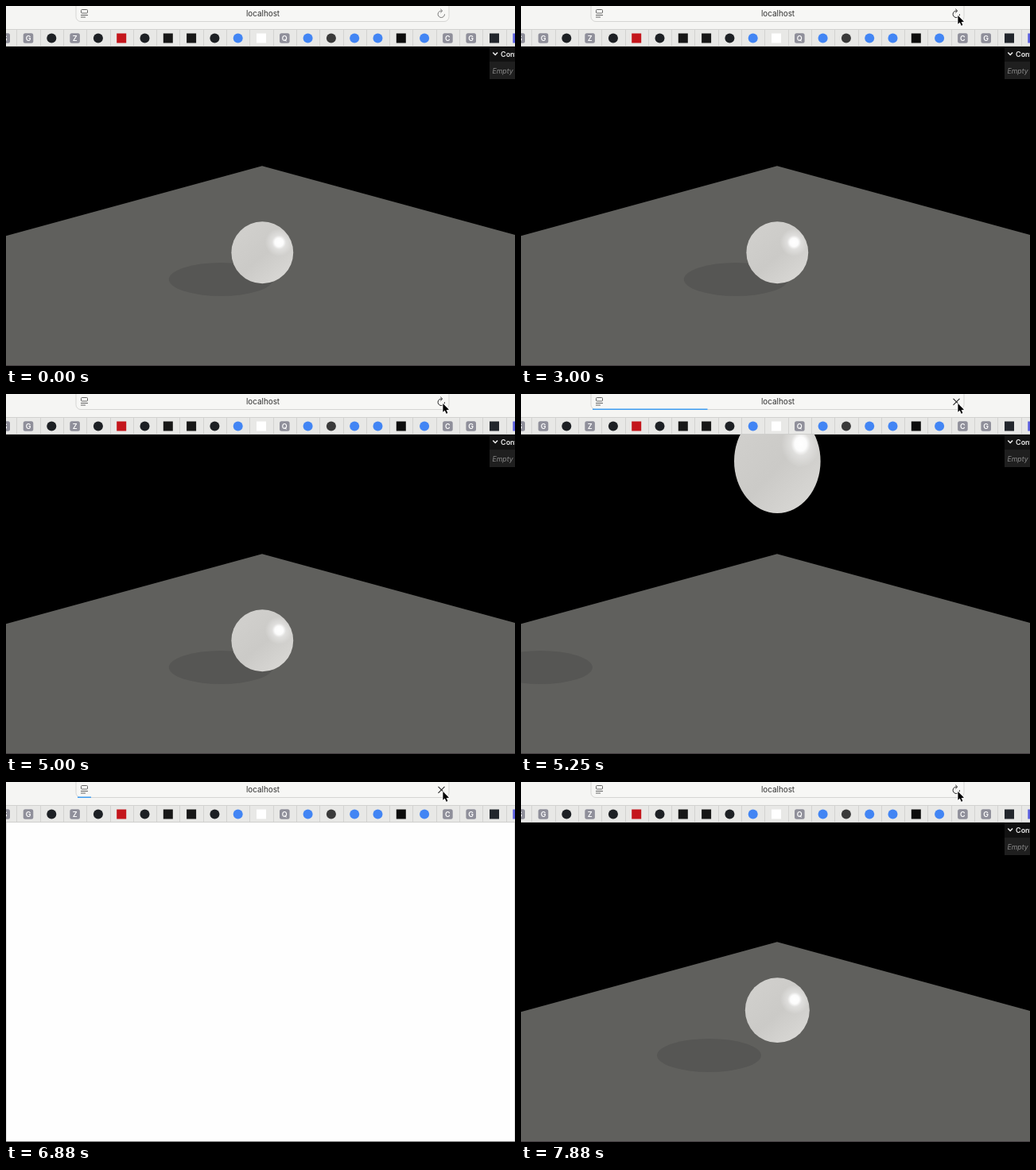
Recreate the animation shown at these times as an HTML page with a canvas. Size 640 by 453 pixels, loop 8000 ms.

```html
<!DOCTYPE html>
<html lang="en">
<head>
<meta charset="utf-8">
<title>Bouncing ball</title>
<style>
html, body { margin: 0; height: 100%; overflow: hidden; background: #000; }
canvas { display: block; width: 640px; height: 453px; }
</style>
</head>
<body>
<canvas id="stage" width="640" height="453"></canvas>
<script>
const ctx = document.getElementById('stage').getContext('2d');
const LOOP = 8000, GRAVITY = 9.82, BOUNCE = 0.372, RADIUS = 0.5;
const RELOADS = [1330, 3076, 5093, 6840];
// Camera at (-3, 3, 3) looking at the origin
const FOCAL = 380, CX = 322, CY = 342.7, DIST = Math.sqrt(27);
const FONT = 'Inter, "Liberation Sans", sans-serif';
const clamp = v => Math.max(0, Math.min(1, v));

function rect(x, y, w, h, fill) {
  ctx.fillStyle = fill;
  ctx.fillRect(x, y, w, h);
}

function round(x, y, w, h, r, fill) {
  ctx.beginPath();
  ctx.roundRect(x, y, w, h, r);
  ctx.fillStyle = fill;
  ctx.fill();
}

function ellipse(x, y, rx, ry, fill) {
  ctx.beginPath();
  ctx.ellipse(x, y, rx, ry, 0, 0, 7);
  ctx.fillStyle = fill;
  ctx.fill();
}

function path(points, close) {
  ctx.beginPath();
  points.forEach(([x, y]) => ctx.lineTo(x, y));
  if (close) ctx.closePath();
}

function stroke(color, width) {
  ctx.strokeStyle = color;
  ctx.lineWidth = width;
  ctx.stroke();
}

function text(str, x, y, style, fill, align = 'left') {
  ctx.font = `${style} ${FONT}`;
  ctx.textAlign = align;
  ctx.fillStyle = fill;
  ctx.fillText(str, x, y);
}

// Height of the ball's centre, `age` seconds after it is dropped
function height(age) {
  const drop = Math.sqrt(2 * 2.5 / GRAVITY);
  if (age < drop) return 3 - GRAVITY / 2 * age * age;
  let speed = GRAVITY * drop * BOUNCE;
  age -= drop;
  while (speed > 0.05) {
    const flight = 2 * speed / GRAVITY;
    if (age < flight) return RADIUS + speed * age - GRAVITY / 2 * age * age;
    age -= flight;
    speed *= BOUNCE;
  }
  return RADIUS;
}

function drawBall(h) {
  const up = h * Math.sqrt(2 / 3), depth = DIST - h / Math.sqrt(3);
  const tilt = Math.atan2(up, depth), half = Math.asin(RADIUS / Math.hypot(up, depth));
  const top = Math.tan(tilt + half), bottom = Math.tan(tilt - half);
  const ry = FOCAL * (top - bottom) / 2;
  const rx = ry * Math.sqrt(1 - (Math.sin(tilt) / Math.cos(half)) ** 2);

  ctx.save();
  ctx.translate(CX + 0.3, CY - FOCAL * (top + bottom) / 2 - 0.5);
  ctx.scale(rx, ry);
  const body = ctx.createLinearGradient(-0.7, -0.6, 0.6, 0.9);
  body.addColorStop(0, '#d0cfcc');
  body.addColorStop(0.5, '#cbcac7');
  body.addColorStop(1, '#d8d7d4');
  ellipse(0, 0, 1, 1, body);
  const shine = ctx.createRadialGradient(0.54, -0.33, 0, 0.54, -0.33, 0.45);
  shine.addColorStop(0, '#fff');
  shine.addColorStop(0.3, '#fffffff0');
  shine.addColorStop(0.5, '#ffffff60');
  shine.addColorStop(1, '#ffffff00');
  ellipse(0, 0, 1, 1, shine);
  ctx.restore();
}

function drawScene(h) {
  rect(0, 51, 640, 402, '#000');
  path([[CX, 201.2], [840, CY], [840, 453], [-196, 453], [-196, CY]], true);
  ctx.fillStyle = '#60605d';
  ctx.fill();
  ellipse(CX - FOCAL * Math.SQRT2 / DIST * h, 344, 65.5, 21, '#565654');
  drawBall(h);

  rect(608, 51, 32, 19, '#111');
  rect(608, 70, 32, 22, '#1f1f1f');
  path([[612.3, 58.5], [615.2, 61.5], [618.1, 58.5]]);
  stroke('#eee', 1.5);
  text('Controls', 622, 63.5, '600 9px', '#ebebeb');
  text('Empty', 611.5, 84.5, 'italic 8.7px', '#8a8a8a');
  rect(0, 452, 640, 1, '#443f42');
}

function drawBlank() {
  rect(0, 51, 640, 402, '#fefefe');
  rect(0, 51, 1, 402, '#e2e2e2');
  rect(639, 51, 1, 402, '#e2e2e2');
  rect(0, 452, 640, 1, '#777');
}

// Tabs: a letter, or o/s for a plain circle/square with its colour
const dark = 'o#1d2024', blue = 'o#4285f4', black = 's#171717';
const TABS = ['S', 'G', dark, 'Z', dark, 's#c4161c', dark, black, black, dark, blue, 's#fff',
  'Q', blue, 'o#3a3a3a', blue, blue, 's#0c0c0c', blue, 'C', 'G', 's#22262c', 's#5b5fe0'];

function drawTab(tab, i) {
  const x = 28 + 29.3 * (i - 1), y = 40.5;
  rect(Math.round(x + 14.6), 30, 1, 20, '#d3d3d1');
  if (tab.length > 1) {
    const fill = tab.slice(1);
    if (tab[0] === 'o') ellipse(x, y, 6, 6, fill);
    else rect(x - 6, y - 6, 12, 12, fill);
  } else {
    round(x - 6.3, y - 6.3, 12.6, 12.6, 2.5, '#8f8f9a');
    text(tab, x, y + 3.2, '600 9px', '#fff', 'center');
  }
}

function drawBrowser(loading, progress, hover) {
  rect(0, 0, 640, 29, '#f5f5f3');
  ctx.beginPath();
  ctx.roundRect(88, -8, 469, 27.5, 6);
  ctx.fillStyle = '#f7f7f5';
  ctx.fill();
  stroke('#d5d5d3', 1);
  if (loading) rect(90, 18.5, 467 * progress, 1.5, '#3d9bf0');
  text('localhost', 323, 13.2, '9.9px', '#303030', 'center');

  ctx.beginPath();
  ctx.roundRect(94.5, 4.5, 8, 4.5, 1);
  stroke('#666', 1);
  rect(94, 11, 9, 1, '#666');
  rect(94, 13.5, 6, 1, '#666');

  if (loading) {
    path([[543.5, 5.8], [551.5, 13.8]]);
    stroke('#222', 1.1);
    path([[551.5, 5.8], [543.5, 13.8]]);
    stroke('#222', 1.1);
  } else {
    const ink = hover ? '#222' : '#777';
    ctx.beginPath();
    ctx.arc(547.3, 10.3, 4.2, 0, 4.9);
    stroke(ink, 1);
    path([[546.3, 3.8], [548.7, 6.1], [546.3, 8.4]]);
    stroke(ink, 1);
  }

  rect(0, 29, 640, 22, '#e8e8e6');
  rect(0, 29, 640, 1, '#d2d2d0');
  TABS.forEach(drawTab);
  rect(0, 50, 640, 1, '#cfcfcd');
}

function drawCursor(x, y) {
  ctx.save();
  ctx.translate(x, y);
  path([[0, 0], [0, 10.8], [2.4, 8.6], [4.2, 12.8], [6, 12], [4.2, 8], [7.6, 7.8]], true);
  ctx.lineJoin = 'round';
  stroke('#fff', 1.6);
  ctx.fillStyle = '#000';
  ctx.fill();
  ctx.restore();
}

function draw(t) {
  const start = RELOADS.filter(s => t >= s - 20).pop();
  const since = start === undefined ? LOOP : t - start;
  const loading = since < 300;
  const blank = start > RELOADS[0] && since >= 20 && since < 150;

  if (blank) drawBlank();
  else drawScene(since < 0 ? RADIUS : height(since / 1000));
  drawBrowser(loading, ((since + 20) / 320) ** 2, t > 800);

  if (t > 80) {
    const p = clamp((t - 80) / 780), ease = p * p * (3 - 2 * p);
    drawCursor(640 - 90.6 * ease, 390 - 378 * ease);
  }
}

function frame(now) {
  draw(now % LOOP);
  requestAnimationFrame(frame);
}
requestAnimationFrame(frame);
</script>
</body>
</html>
```
